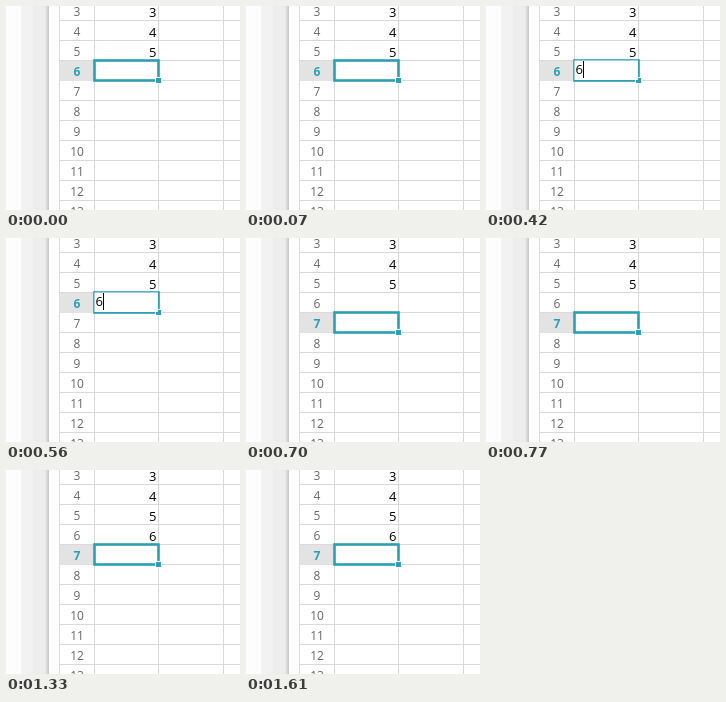
Animation of 234x204 px, one loop 1.68 s. Source, as an HTML page:

```html
<!DOCTYPE html>
<html lang="en">
<head>
<meta charset="utf-8">
<title>Spreadsheet entry</title>
<style>
  html, body { margin: 0; width: 100%; height: 100%; overflow: hidden; background: #fff; }
  svg { display: block; width: 234px; height: 204px; }
  text { font-family: "Open Sans", "Noto Sans", sans-serif; }
  .head { font-size: 12px; fill: #666; text-anchor: middle; }
  .on { font-weight: 700; fill: #2b9fb3; }
  .cell { font-size: 13px; fill: #000; text-anchor: end; }
  .line { stroke: #d9d9d9; shape-rendering: crispEdges; }

  .before, .after, .edit, .value, .cursor { animation: 1680ms step-end infinite; }
  .before { animation-name: before; }
  .after { animation-name: after; }
  .edit { animation-name: edit; }
  .value { animation-name: value; }
  .cursor { animation-name: cursor; }

  /* typing at 420 ms, Enter at 700 ms, value shown at 1330 ms */
  @keyframes before { 0% { opacity: 1 } 41.6667%, 100% { opacity: 0 } }
  @keyframes after { 0% { opacity: 0 } 41.6667%, 100% { opacity: 1 } }
  @keyframes edit { 0% { opacity: 0 } 25% { opacity: 1 } 41.6667%, 100% { opacity: 0 } }
  @keyframes value { 0% { opacity: 0 } 79.1667%, 100% { opacity: 1 } }
  @keyframes cursor { 0% { transform: none } 41.6667%, 100% { transform: translateY(20px) } }
</style>
</head>
<body>
<svg viewBox="0 0 234 204">
  <defs>
    <linearGradient id="shade">
      <stop offset="0" stop-color="#ececec"/>
      <stop offset="1" stop-color="#c4c4c4"/>
    </linearGradient>
  </defs>
  <rect width="234" height="204" fill="#fff"/>
  <rect width="15" height="204" fill="#fdfdfd"/>
  <rect x="15" width="12" height="204" fill="#f2f2f2"/>
  <rect x="27" width="12" height="204" fill="#ededed"/>
  <rect x="39" width="4" height="204" fill="url(#shade)"/>
  <g id="grid"></g>
  <g class="before">
    <rect x="54" y="55" width="34" height="20" fill="#e3e3e3"/>
    <text class="head on" x="71" y="70">6</text>
  </g>
  <g class="after">
    <rect x="54" y="75" width="34" height="20" fill="#e3e3e3"/>
    <text class="head on" x="71" y="90">7</text>
  </g>
  <text class="cell value" x="150.5" y="71">6</text>
  <g class="cursor">
    <rect x="88.5" y="54.5" width="64" height="20" fill="#fff" stroke="#2b9fb3" stroke-width="2.6"/>
    <rect x="149" y="71" width="7" height="7" fill="#fff"/>
    <rect x="150" y="72" width="5" height="5" fill="#2b9fb3"/>
  </g>
  <g class="edit">
    <rect x="88.5" y="54.5" width="63.5" height="19.5" fill="#fff"/>
    <text class="cell" x="97" y="68">6</text>
    <rect x="97" y="55" width="1" height="17" fill="#000"/>
  </g>
</svg>
<script>
  const grid = document.getElementById("grid");

  function add(tag, attrs, label = "") {
    const node = document.createElementNS("http://www.w3.org/2000/svg", tag);
    for (const key in attrs) node.setAttribute(key, attrs[key]);
    node.textContent = label;
    grid.append(node);
  }

  for (const x of [53.5, 88.5, 152.5, 217.5])
    add("line", { class: "line", x1: x, x2: x, y1: 0, y2: 204 });

  for (let row = 3; row <= 13; row++) {
    const y = (row - 3) * 20;
    add("line", { class: "line", x1: 54, x2: 234, y1: y + 14.5, y2: y + 14.5 });
    add("text", { class: "head", x: 71, y: y + 10 }, row);
    if (row < 6) add("text", { class: "cell", x: 150.5, y: y + 11 }, row);
  }
</script>
</body>
</html>
```
